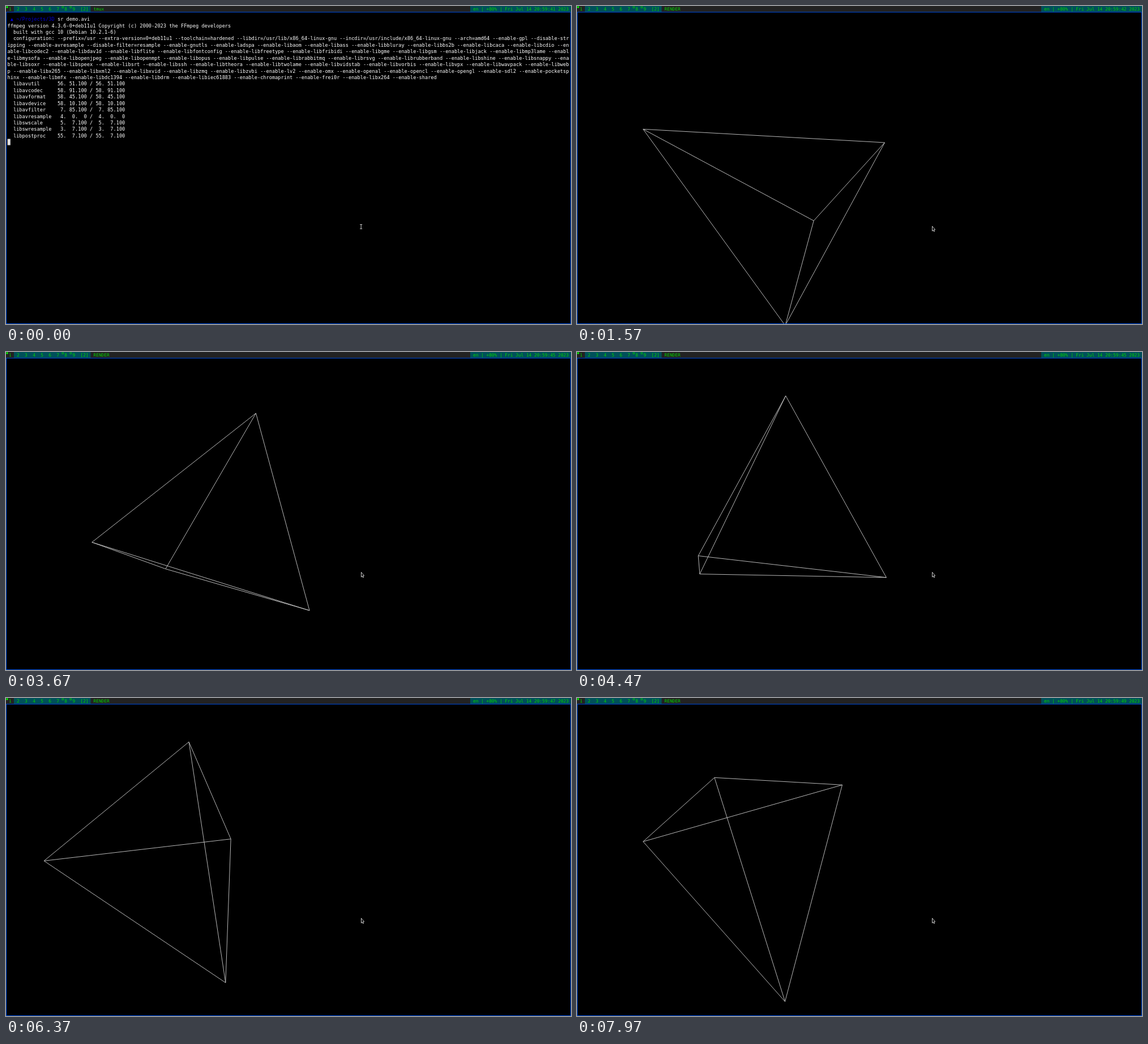
Animation, 998 px wide and 561 px high, one loop 8000 ms. Source, as an HTML page with a canvas:

```html
<!DOCTYPE html>
<html>
<head>
<meta charset="utf-8">
<style>
  html, body { margin: 0; width: 100%; height: 100%; overflow: hidden; background: #000; }
  canvas { display: block; }
</style>
</head>
<body>
<canvas id="stage" width="998" height="561"></canvas>
<script>
const ctx = document.getElementById('stage').getContext('2d');
const LOOP = 8000, WINDOW_OPENS = 290;
const MONO = '"DejaVu Sans Mono", monospace';
const GREEN = '#00d400', TEAL = '#00505a', DARK = '#222', BLUE = '#0000d8';

const COLUMN = 5.2, ROW = 11.43;
const OUTPUT = [
  'ffmpeg version 4.3.6-0+deb11u1 Copyright (c) 2000-2023 the FFmpeg developers',
  '  built with gcc 10 (Debian 10.2.1-6)',
  '  configuration: --prefix=/usr --extra-version=0+deb11u1 --toolchain=hardened --libdir=/usr/lib/x86_64-linux-gnu --incdir=/usr/include/x86_64-linux-gnu --arch=amd64 --enable-gpl --disable-str',
  'ipping --enable-avresample --disable-filter=resample --enable-gnutls --enable-ladspa --enable-libaom --enable-libass --enable-libbluray --enable-libbs2b --enable-libcaca --enable-libcdio --en',
  'able-libcodec2 --enable-libdav1d --enable-libflite --enable-libfontconfig --enable-libfreetype --enable-libfribidi --enable-libgme --enable-libgsm --enable-libjack --enable-libmp3lame --enabl',
  'e-libmysofa --enable-libopenjpeg --enable-libopenmpt --enable-libopus --enable-libpulse --enable-librabbitmq --enable-librsvg --enable-librubberband --enable-libshine --enable-libsnappy --ena',
  'ble-libsoxr --enable-libspeex --enable-libsrt --enable-libssh --enable-libtheora --enable-libtwolame --enable-libvidstab --enable-libvorbis --enable-libvpx --enable-libwavpack --enable-libweb',
  'p --enable-libx265 --enable-libxml2 --enable-libxvid --enable-libzmq --enable-libzvbi --enable-lv2 --enable-omx --enable-openal --enable-opencl --enable-opengl --enable-sdl2 --enable-pocketsp',
  'hinx --enable-libmfx --enable-libdc1394 --enable-libdrm --enable-libiec61883 --enable-chromaprint --enable-frei0r --enable-libx264 --enable-shared',
  '  libavutil      56. 51.100 / 56. 51.100',
  '  libavcodec     58. 91.100 / 58. 91.100',
  '  libavformat    58. 45.100 / 58. 45.100',
  '  libavdevice    58. 10.100 / 58. 10.100',
  '  libavfilter     7. 85.100 /  7. 85.100',
  '  libavresample   4.  0.  0 /  4.  0.  0',
  '  libswscale      5.  7.100 /  5.  7.100',
  '  libswresample   3.  7.100 /  3.  7.100',
  '  libpostproc    55.  7.100 / 55.  7.100'
];

const CENTER = [312.6, 323.6], SIZE = 259.8;
const CORNERS = [[1, 0, 0], [0, 1, 0], [0, 0, 1], [-0.5, -0.5, -0.5]];
const SPIN = 0.1532; // radians per second

// Turns the vector (a, b) by an angle.
function turn(a, b, angle) {
  const c = Math.cos(angle), s = Math.sin(angle);
  return [a * c - b * s, a * s + b * c];
}

// Three turns at speeds -1 : 2 : 3, then an orthographic view.
function project([x, y, z], angle) {
  [x, z] = turn(x, z, Math.PI / 4 - angle);
  [x, y] = turn(x, y, -2 * angle);
  [z, x] = turn(z, x, 3 * angle);
  return [CENTER[0] + SIZE * z, CENTER[1] + SIZE * y];
}

function projectCorner(corner, angle) {
  const [x, y, z] = corner;
  const [c, d] = turn(x, z, Math.PI / 4 - angle);
  const [e, down] = turn(c, y, -2 * angle);
  const across = e * Math.sin(3 * angle) + d * Math.cos(3 * angle);
  return [CENTER[0] + SIZE * across, CENTER[1] + SIZE * down];
}

function box(color, x, y, w, h) {
  ctx.fillStyle = color;
  ctx.fillRect(x, y, w, h);
}

function text(string, x, y, color) {
  ctx.fillStyle = color;
  ctx.fillText(string, x, y);
}

function polyline(points, color, width) {
  ctx.beginPath();
  points.forEach(([x, y]) => ctx.lineTo(x, y));
  ctx.strokeStyle = color;
  ctx.lineWidth = width;
  ctx.stroke();
}

function drawBar(title, seconds) {
  box(DARK, 0, 0, 998, 10.5);
  box(TEAL, 14, 0, 135.5, 10.5);
  box(TEAL, 820, 0, 178, 10.5);
  ctx.font = '7.8px ' + MONO;
  for (let n = 1; n <= 9; n++) text(n, 5 + (n - 1) * 14.05, 8, GREEN);
  text('[2]', 131.5, 8, GREEN);
  text(title, 154.5, 8, GREEN);
  text(`en | +80% | Fri Jul 14 20:59:${seconds} 2023`, 825, 8, GREEN);
  box('#00ff00', 0.5, 0.5, 3, 3);
  ctx.strokeStyle = GREEN;
  ctx.lineWidth = 0.7;
  for (const x of [99, 113]) ctx.strokeRect(x, 0.8, 2.8, 2.8);
}

function drawTerminal() {
  const left = 2.6, baseline = 26.1;
  ctx.font = '8.637px ' + MONO;
  text('▲', left + COLUMN, baseline, BLUE);
  text('~/Projects/3D', left + 3 * COLUMN, baseline, BLUE);
  text('sr demo.avi', left + 17 * COLUMN, baseline, '#fff');
  OUTPUT.forEach((line, i) => text(line, left, baseline + (i + 1) * ROW, '#fff'));
  box('#ddd', left, 234.5, 5.2, 11);
  polyline([[627.2, 385.5], [627.2, 393]], '#ccc', 1);
  for (const y of [385.5, 393]) polyline([[625.2, y], [629.2, y]], '#ccc', 1);
}

function drawRender(seconds) {
  const points = CORNERS.map(corner => projectCorner(corner, SPIN * seconds));
  points.forEach((from, i) =>
    points.slice(i + 1).forEach(to => polyline([from, to], '#ccc', 0.9)));
  const arrow = [[627.5, 388.5], [627.5, 397], [629.3, 395.3], [630.6, 398],
                 [631.6, 397.4], [630.5, 394.8], [632.6, 394.5], [627.5, 388.5]];
  polyline(arrow, '#ddd', 0.9);
}

function draw(now) {
  const ms = now % LOOP;
  const rendering = ms >= WINDOW_OPENS;
  box('#000', 0, 0, 998, 561);
  if (rendering) drawRender((ms - WINDOW_OPENS) / 1000);
  else drawTerminal();
  drawBar(rendering ? 'RENDER' : 'tmux', 41 + Math.floor((ms + 340) / 1000));
  ctx.strokeStyle = '#0050e8';
  ctx.lineWidth = 1;
  ctx.strokeRect(0.5, 10.9, 997, 549.6);
  requestAnimationFrame(draw);
}
requestAnimationFrame(draw);
</script>
</body>
</html>
```
